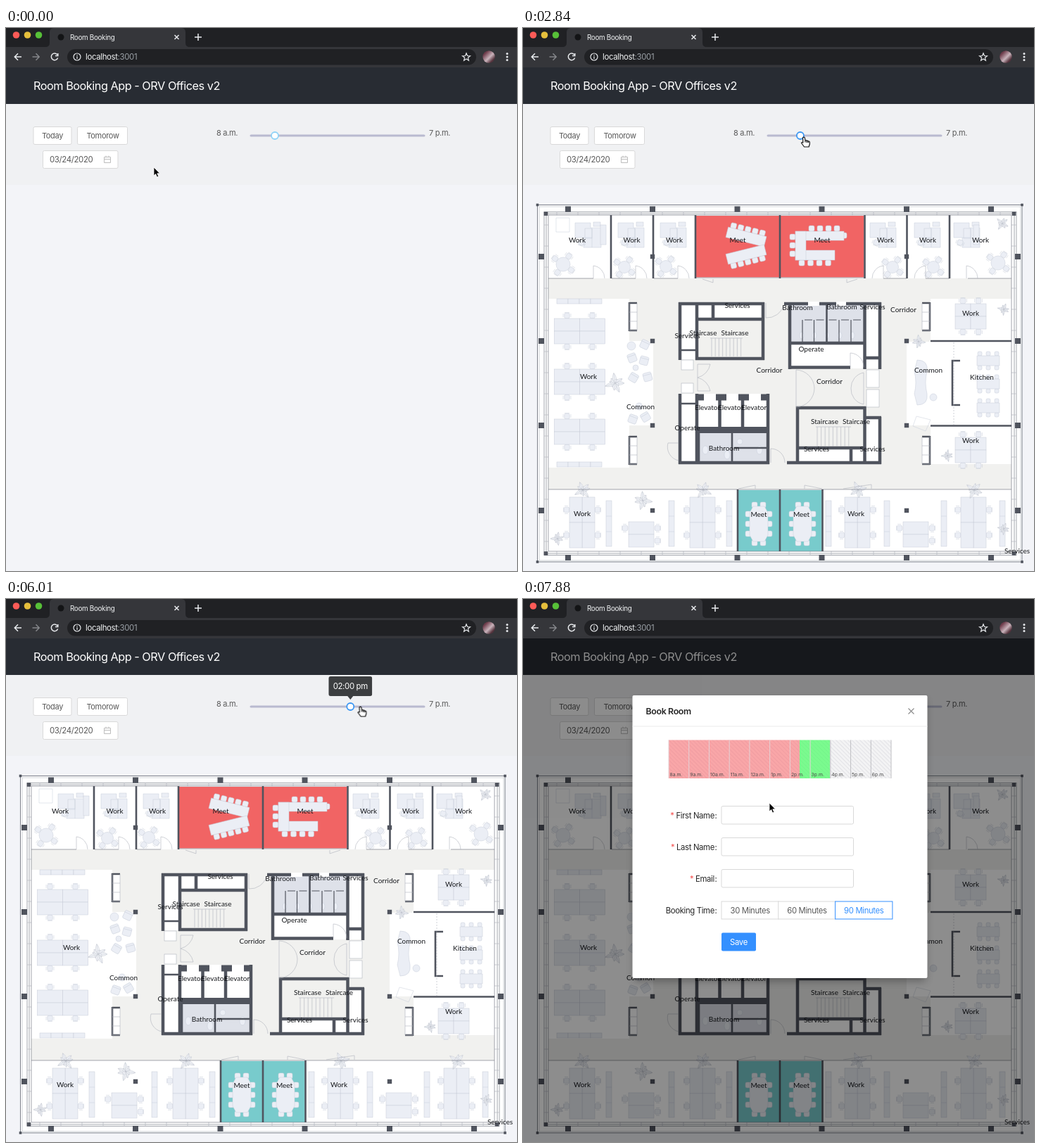
Write an HTML page that moves like this. It is 726x772 px and loops after 8000 ms.

```html
<!DOCTYPE html>
<html lang="en">
<head>
<meta charset="utf-8">
<title>Room Booking</title>
<style>
html, body { margin: 0; width: 100%; height: 100%; overflow: hidden; background: #f3f4f8; }
svg { display: block; }
text { font: 11px Inter, sans-serif; letter-spacing: -.03em; fill: #595959; }
.mid { text-anchor: middle; }
.end { text-anchor: end; }
.box { fill: #fff; stroke: #d9d9d9; }
.icon { fill: none; stroke: #e8eaed; stroke-width: 1.5; }

.wall { fill: none; stroke: #50545e; stroke-width: 4.5; }
.thin { stroke-width: 2.6; }
.thick { stroke-width: 9; }
.line { fill: none; stroke: #b0b4bc; stroke-width: .6; }
.edge { fill: none; stroke: #7c808a; stroke-width: .7; }
.white { fill: #fff; }
.floor { fill: #f1f1ef; }
.tile { fill: #dee1e9; }
.pillar { fill: #50545e; }
.furn { fill: #ebeef5; stroke: #c6ccd8; stroke-width: .5; }
.leaf { fill: #f3f5f9; stroke: #bcc1cb; stroke-width: .45; }
.label text { font: 10px Lato, sans-serif; letter-spacing: 0; fill: #16181c; text-anchor: middle; }
.form text { font-size: 11.3px; }

@property --n { syntax: "<integer>"; inherits: true; initial-value: 0; }
.plan, .furn-layer, .busy, .free, .cursor, .arrow, .hand, .slider, .ring, .tip, .mask, .modal {
  animation: 8s linear infinite;
}
.plan, .arrow, .hand, .slider, .ring, .tip { animation-timing-function: step-end; }
.plan { animation-name: plan; }
.furn-layer { animation-name: furnish; }
.busy { animation-name: busy; }
.free { animation-name: free; }
.cursor { animation-name: move; }
.arrow { animation-name: arrow; }
.hand { animation-name: hand; }
.slider { animation-name: slide; }
.knob { transform: translateX(calc(var(--n) * 11.92px)); }
.times { transform: translateY(calc(var(--n) * -28px)); }
.ring { animation-name: ring; fill: #fff; stroke-width: 1.8; }
.tip { animation-name: tip; }
.mask { animation-name: mask; }
.modal { animation-name: zoom; transform-origin: 365px 342px; }

@keyframes plan { 0% { opacity: 0 } 1.5%, 100% { opacity: 1 } }
@keyframes furnish {
  0%, 5% { opacity: 0 } 8.875%, 13% { opacity: .9 } 14.875%, 100% { opacity: 1 }
}
@keyframes busy {
  0%, 17.75% { fill: #fff } 24%, 77.25% { fill: #f16464 } 82%, 100% { fill: #78cbcc }
}
@keyframes free { 0%, 17.75% { fill: #fff } 24%, 100% { fill: #78cbcc } }
@keyframes move {
  0%, 18.125% { transform: translate(210px, 198px) }
  19.25% { transform: translate(290px, 188px) }
  20.75% { transform: translate(427px, 167.5px) }
  23.625% { transform: translate(415px, 160px) }
  28.125% { transform: translate(397px, 157px) }
  31%, 35% { transform: translate(398px, 155px) }
  41.25% { transform: translate(410.5px, 155px) }
  47.125% { transform: translate(422px, 155px) }
  53% { transform: translate(436.5px, 154px) }
  63.375% { transform: translate(472px, 153.5px) }
  75.125% { transform: translate(503.5px, 153px) }
  82%, 84.6% { transform: translate(510px, 153px) }
  89.625%, 100% { transform: translate(350px, 290px) }
}
@keyframes arrow { 0%, 85.25%, 100% { opacity: 1 } 29.5% { opacity: 0 } }
@keyframes hand { 0%, 85.25%, 100% { opacity: 0 } 29.5% { opacity: 1 } }
@keyframes ring { 0%, 92.625%, 100% { stroke: #8fd3f7 } 29.5% { stroke: #3b97f3 } }
@keyframes slide {
  0% { --n: 0 } 35.5% { --n: 1 } 47% { --n: 2 } 51.5% { --n: 3 } 57.5% { --n: 4 }
  60.3% { --n: 5 } 63.25% { --n: 6 } 67.5% { --n: 7 } 70.6% { --n: 8 }
  73.6% { --n: 9 } 78%, 100% { --n: 10 }
}
@keyframes tip {
  0%, 41.25%, 51.5%, 56%, 60.3%, 63.25%, 67.5%, 70.6%, 73.6%, 78%, 92.625%, 100% { opacity: 0 }
  37%, 48.6%, 53%, 58.9%, 61.75%, 64.75%, 69%, 72%, 75%, 79.5% { opacity: 1 }
}
@keyframes mask { 0%, 92.4% { opacity: 0 } 95.625% { opacity: .18 } 98.2%, 100% { opacity: .45 } }
@keyframes zoom {
  0%, 92.3% { transform: scale(.2); opacity: 0 }
  94.1% { transform: scale(.62); opacity: .6 }
  95.625% { transform: scale(.888); opacity: .93 }
  97.8%, 100% { transform: none; opacity: 1 }
}
</style>
</head>
<body>
<svg width="726" height="772" viewBox="0 0 726 772">
  <defs>
    <pattern id="hatch" width="4" height="4" patternUnits="userSpaceOnUse" patternTransform="rotate(-45)">
      <path fill="#f3f3f4" d="M0 0H4V4H0Z"/><path fill="#e2e2e6" d="M0 0H1V4H0Z"/>
    </pattern>
    <linearGradient id="photo" x2="1" y2="1">
      <stop offset=".2" stop-color="#6d3b4a"/><stop offset=".55" stop-color="#c9b3bb"/><stop offset=".8" stop-color="#54323c"/>
    </linearGradient>
    <filter id="soft" x="-20%" y="-20%" width="140%" height="140%"><feGaussianBlur stdDeviation="6"/></filter>
  </defs>

  <path fill="#f3f4f8" d="M0 0H726V772H0Z"/>
  <path fill="#f0f1f3" d="M0 108H726V223H0Z"/>

  <!-- browser bar -->
  <path fill="#202124" d="M0 0H726V28H0Z"/>
  <path fill="#35363a" d="M0 27H56Q62 27 62 21V6Q62 0 68 0H249Q255 0 255 6V21Q255 27 261 27H726V56H0Z"/>
  <circle cx="14.5" cy="10" r="4.8" fill="#fc5b57"/>
  <circle cx="30.5" cy="10" r="4.8" fill="#e5bf3c"/>
  <circle cx="46.5" cy="10" r="4.8" fill="#57c038"/>
  <circle cx="78" cy="13" r="4.5" fill="#131416"/>
  <text x="91" y="16.7" style="font-size:9.8px;fill:#f1f3f4">Room Booking</text>
  <path class="icon" d="M239.5 10L245.5 16M245.5 10L239.5 16M268 13H278M273 8V18"/>
  <path class="icon" d="M22 41H12.5M17 36.3L12.3 41L17 45.7M73 38A4.8 4.8 0 1 0 73.6 42.5M73.8 36V39.6H70"/>
  <path class="icon" style="stroke:#85878b" d="M37.5 41H47M42.5 36.3L47.2 41L42.5 45.7"/>
  <rect x="87" y="30" width="581" height="22.5" rx="11.25" fill="#202124"/>
  <g class="icon" style="stroke-width:1.2">
    <circle cx="101" cy="41" r="5"/><path d="M101 40.3V44M101 38V39.2"/>
    <path d="M654 35.8L655.5 39.5 659.5 39.8 656.4 42.3 657.4 46.2 654 44 650.6 46.2 651.6 42.3 648.5 39.8 652.5 39.5Z"/>
  </g>
  <text x="113" y="45.3" style="font-size:11.4px;fill:#f1f3f4">localhost<tspan fill="#9aa0a6">:3001</tspan></text>
  <circle cx="686" cy="41" r="8.7" fill="url(#photo)"/>
  <g fill="#e8eaed"><circle cx="712" cy="36.5" r="1.5"/><circle cx="712" cy="41" r="1.5"/><circle cx="712" cy="45.5" r="1.5"/></g>

  <!-- page header and filters -->
  <path fill="#282c33" d="M0 56H726V108H0Z"/>
  <text x="39" y="88" style="font-size:16.3px;fill:#fff">Room Booking App - ORV Offices v2</text>
  <g class="box">
    <rect x="39" y="140.5" width="54" height="25" rx="2"/><rect x="101.5" y="140.5" width="71" height="25" rx="2"/>
    <rect x="52.5" y="174.5" width="106.5" height="25" rx="2"/>
  </g>
  <text class="mid" x="66" y="157">Today</text>
  <text class="mid" x="137.5" y="157">Tomorow</text>
  <text x="62" y="191" style="font-size:11.4px">03/24/2020</text>
  <path fill="none" stroke="#bdbdbd" d="M139.5 183.5H148.5V191.5H139.5ZM139.5 186.5H148.5M142 181.5V184M146 181.5V184"/>
  <text x="299" y="153">8 a.m.</text>
  <text x="601" y="153">7 p.m.</text>

  <g class="plan" id="plan"></g>

  <rect x="346.5" y="151.4" width="249" height="3.2" rx="1.6" fill="#b9bad0"/>
  <g class="slider"><g class="knob">
    <circle class="ring" cx="382" cy="153" r="5"/>
    <g class="tip">
      <path fill="#3c3e40" d="M354 110H410Q413 110 413 113V135Q413 138 410 138H386L382 143L378 138H354Q351 138 351 135V113Q351 110 354 110Z"/>
      <svg x="351" y="110" width="62" height="28"><g class="times" id="times"></g></svg>
    </g>
  </g></g>

  <path class="mask" d="M0 56H726V772H0Z"/>
  <g class="modal" id="modal"></g>

  <g class="cursor">
    <path class="arrow" stroke="#fff" stroke-width=".8" d="M0 0V12L2.7 9.5 4.6 14 6.7 13.1 4.8 8.8H8.5Z"/>
    <path class="hand" fill="#fff" stroke="#111" stroke-width="1.2" stroke-linejoin="round"
      d="M-1.5 1Q0 -.8 1.3 1L2 5Q3.5 4 4.3 5.5 5.8 4.6 6.3 6.2 8 5.8 8.3 7.5V10L7 14H.5L-3.5 8.5Q-3.3 6.8-1.2 8ZM2 5V7.5M4.3 5.5V8M6.3 6.2V8.2"/>
  </g>
</svg>

<script>
const $ = id => document.getElementById(id);
const rect = (x, y, w, h, cls = "", extra = "") =>
  `<rect x="${x}" y="${y}" width="${w}" height="${h}" class="${cls}" ${extra}/>`;
const path = (d, cls = "", extra = "") => `<path d="${d}" class="${cls}" ${extra}/>`;
const oval = (x, y, rx, ry = rx) => `<ellipse cx="${x}" cy="${y}" rx="${rx}" ry="${ry}"/>`;
const text = (x, y, s, cls = "", style = "") =>
  `<text x="${x}" y="${y}" class="${cls}" style="${style}">${s}</text>`;
const at = (x, y, s, turn = 0) => `<g transform="translate(${x} ${y}) rotate(${turn})">${s}</g>`;
const each = (list, f) => list.map(f).join("");
const count = (n, f) => Array.from({ length: n }, (_, i) => f(i)).join("");

// furniture
const seat = (x, y, s = 8) => rect(x - s / 2, y - s / 2, s, s, "", 'rx="2"');
const chair = (x, y, turn = 0) => at(x, y, seat(0, 0, 7.5) + path("M-5.5-2V3M5.5-2V3M-3.5 4.5H3.5"), turn);
const pod = (x, y, turn = 0, w = 36) => at(x, y,
  each([-1, 1], i => chair(i * w / 2, 22) + chair(i * w / 2, -22, 180)) +
  each([-w, 0], i => rect(i, -18, w, 18) + rect(i, 0, w, 18)), turn);
const round = (x, y, r = 8.5) => at(x, y,
  count(4, i => at(0, 0, chair(0, r + 4), i * 90 + 35)) + oval(0, 0, r));
const plant = (x, y, r = 12) => `<g class="leaf">` + at(x, y, count(11, i => {
  const len = r * (.7 + .3 * Math.sin(i * 2.3 + x));
  return at(0, 0, path(`M0 0Q${len / 2} ${-r / 3} ${len} 0Q${len / 2} ${r / 3} 0 0H${len}`), i * 32.7 + x);
})) + `</g>`;
const office = x => at(x, 0,
  path("M0 277H22V284H37V312H12V298H0Z") + chair(9, 305, 20) + rect(14, 285, 10, 14) + rect(26, 276, 10, 6) +
  path("M24 285V312M12 298H24"));
const strip = x => rect(x - 4, 672, 8, 65) + path(`M${x - 4} 694h8m-8 22h8`);
const arm = (x, y, turn) => at(x, y, rect(-6, -6, 12, 12, "", 'rx="2"') + path("M-6-3H6"), turn);

// meeting tables
const slant = (y, turn, side) => at(317, y,
  count(5, i => seat(-21 + i * 10.5, side * 11)) + rect(-28, -7.5, 56, 15), turn);
const horseshoe = () =>
  count(4, i => seat(410 + i * 12, 285) + seat(396 + i * 12.5, 334)) +
  count(3, i => seat(383, 297 + i * 12)) + seat(456, 295) +
  rect(387, 289, 69, 13) + rect(387, 316, 56, 14) + rect(387, 289, 15, 41);
const board = x => at(x, 705,
  each([-1, 1], s => count(3, i => seat(s * 15, -14 + i * 14)) + seat(s * 6, -27) + seat(s * 6, 27)) +
  path("M-8-25H8L13-16V16L8 25H-8L-13 16V-16Z"));
const canteen = y => at(661, y,
  count(3, i => seat(-12 + i * 12, 10, 6) + seat(-12 + i * 12, -10, 6)) + rect(-16, -7, 32, 14));

const furniture = () => `<g class="furn furn-layer">` +
  path("M47 270h19v20h-19Z", "", 'fill="none"') +
  each([74, 135, 195, 493, 556, 612], office) + rect(110, 280, 8, 28) + rect(640, 280, 8, 28) +
  round(57, 336, 10) + round(144, 340) + round(203, 339) + round(525, 340) + round(583, 340) + round(675, 334, 10) +
  plant(681, 278, 10) +
  slant(297, 14, -1) + slant(322, -14, 1) + horseshoe() + board(335) + board(397) +
  each([431, 503, 574], y => pod(80.5, y)) +
  count(4, i => rect(48 + i * 16, 385, 16, 7) + rect(48 + i * 16, 617, 16, 7)) +
  plant(131, 505, 15) + oval(154, 452, 6) + oval(160, 483, 4) + oval(165, 538, 5) +
  arm(173, 450, 25) + arm(155, 469, -20) + arm(172, 473, 15) + arm(157, 497, 30) + arm(177, 496, -15) +
  arm(156, 556, 20) + arm(174, 553, -30) +
  each([84, 255, 475, 640], x => pod(x, 703, 90) + plant(x + 1, 657, 13)) +
  each([168, 558], x => rect(x - 18, 702, 36, 18) + rect(x - 18, 720, 36, 18) +
    chair(x - 23, 711, 90) + chair(x + 23, 729, -90) + chair(x + 23, 711, -90)) +
  each([122, 211, 293, 434, 517, 598, 681], strip) +
  plant(170, 672, 14) + plant(49, 726, 10) + plant(683, 712, 9) +
  pod(636, 410, 0, 22) + pod(636, 600, 0, 22) + plant(683, 400, 9) + plant(603, 608, 9) + plant(562, 446, 10) +
  path("M560 472Q576 472 574 488Q570 504 574 520Q576 536 560 536L556 520Q560 504 556 488Z") + oval(583, 525, 5) +
  path("M559 552l20 5l-7 16l-18-7Z", "", 'fill="none"') +
  each([473, 506, 540], canteen) +
  count(5, i => oval(396 + i * 18, 437, 3, 5)) +
  oval(259, 600, 4, 6) + oval(290, 607, 4, 6) + oval(308, 588, 4) + oval(336, 600, 4, 6) +
  `</g>`;

// building
const pillars = () => {
  const xs = [64, 184, 304.5, 424.5, 545, 665], ys = [325, 445, 565, 686];
  const dot = (x, y, r = 4) => rect(x - r, y - r, 2 * r, 2 * r, "pillar");
  return each(xs, x => dot(x, 257.5) + dot(x, 753)) +
    each(ys, y => dot(26, y) + dot(703, y) + dot(184, y, 3.2) + dot(545, y, 3.2)) +
    each([32.5, 697.5], x => dot(x, 264, 2.8) + dot(x, 747, 2.8)) +
    each([20.5, 709], x => dot(x, 251.5, 1.8) + dot(x, 759, 1.8));
};
const facade = () =>
  rect(20.5, 251.5, 688.5, 507.5, "white") +
  rect(20.5, 251.5, 688.5, 507.5, "edge", 'style="stroke-width:1"') +
  rect(23, 254, 684, 503, "line") + rect(30, 261.5, 671, 488, "edge") + rect(33, 264, 665, 483, "edge") +
  count(22, i => path(`M${48 + i * 30} 261.5v4.5M${48 + i * 30} 744v5.5`, "line")) +
  count(16, i => path(`M30 ${280 + i * 30}h6M694 ${280 + i * 30}h7`, "line"));
const rooms = () =>
  rect(36, 266, 658, 478, "floor") +
  rect(36, 266, 658, 90, "white") + rect(36, 656, 658, 88, "white") +
  rect(36, 385, 115, 240, "white") + rect(150, 445, 35, 120, "white") +
  rect(579, 385, 115, 235, "white") + rect(545, 446, 40, 119, "white") +
  rect(246, 267, 118.5, 87.5, "busy") + rect(366, 267, 118.5, 87.5, "busy") +
  rect(306, 657, 58.5, 87, "free") + rect(366, 657, 58.5, 87, "free") +
  rect(223, 392, 22, 79, "white") + rect(247, 392, 94, 22, "white") + rect(380, 392, 128, 92, "white") +
  rect(223, 520, 21, 98, "white") + rect(247, 522, 101, 96, "white") +
  rect(390, 598, 118, 20, "white") + rect(487, 553, 21, 65, "white") +
  rect(380, 394, 104, 52, "tile") + rect(249, 576, 98, 41, "tile");
const walls = () =>
  path("M36 266H694V744H36ZM36 356H100M126 356H160M186 356H220M246 355H485M512 356H545M572 356H606M632 356H694M36 656H694", "edge") +
  path("M125 266V356M185 266V356M245 266V356M365 266V356M485.5 266V356M545.5 266V356M606 266V356M305 656V744M365 656V744M425.5 656V744M579 445H694M579 565.5H694", "wall thin") +
  path("M221 392H343M223 390V472M247 390V472M247 414H343M341 390V472M245 470H343M270 392V413", "wall") +
  path("M371 392H509M379 390V485M379 448H485M377 482.5H465M485.5 390V485M507 390V485M485 469H509", "wall") +
  path("M223 520V620M247 520V620M279.5 524V571M312 524V571M348 520V620M221 618H350", "wall") +
  path("M245 525H350M245 571.5H350", "wall thick") +
  path("M390 538V620M388 540H487M485.5 538V620M388 597H487M466 597V618M375 618H509M507 553V620M486 554H509", "wall") +
  path("M221 458H245M221 534H245M431.5 392V448M297 576V618M300 597H346M250 576V618", "wall thin") +
  each([397, 413.5, 431.5, 449, 466], x => path(`M${x} 415V446M${x + 3} 415h11`, "wall", 'style="stroke-width:1.2"')) +
  each([257, 289, 321], x => rect(x, 520, 17, 10, "white")) + rect(405, 389, 16, 6, "white") + rect(445, 389, 14, 6, "white") +
  each([151, 567], x => each([391, 581], y => rect(x, y, 11, 39, "white") +
    path(`M${x} ${y}h11M${x} ${y + 39}h11M${x + (x < 300 ? 0 : 11)} ${y - 1}v41`, "wall thin") +
    path(`M${x} ${y}v39h11v-39M${x} ${y + 13}h11m-11 13h11`, "line"))) +
  path("M621 473H610V536H621", "wall thin") +
  path("M612 447V564", "line", 'stroke-dasharray="2 2"') +
  each([472, 505], y => rect(225, y, 17, 14, "white") + rect(225, y, 17, 14, "line")) +
  each([486, 514], y => rect(488, y, 18, 25, "white") + rect(488, y, 18, 25, "line")) +
  count(9, i => path(`M${268 + i * 5.2} 441V467M${418 + i * 5.6} 567V595`, "line")) +
  path("M266 441H312M416 567H466", "line");
const doors = () => each([100, 160, 220, 630], x => path(`M${x} 356V338A18 18 0 0 1 ${x + 16} 356`, "line")) +
  path("M512 356V338A18 18 0 0 0 496 356M572 356V338A18 18 0 0 0 556 356M255 357L270 362V357M475 357L460 362V357", "line") +
  path("M248 478H266A24 24 0 0 1 248 497A24 24 0 0 1 266 516H248ZM388 486A27 27 0 0 1 414 512A27 27 0 0 1 388 539Z", "line") +
  path("M484 490A22 22 0 0 0 466 512A22 22 0 0 0 484 535ZM345 391V412A24 24 0 0 0 370 394M221 590H206A20 20 0 0 0 221 615M352 618V598A20 20 0 0 1 372 618M465 482V462A20 20 0 0 1 484 482", "line") +
  path("M306 655L330 650V655M425 655L400 650V655M455 655L495 649V655", "line");

const places = {
  Work: [77, 305, 154.5, 305, 215, 305, 515, 305, 575, 305, 650, 305, 93, 499, 84, 694, 473, 694, 636, 409, 636, 590],
  Meet: [305, 305, 425, 305, 335, 695, 395.5, 695],
  Services: [304.5, 397.5, 233.5, 441, 496.5, 400, 417, 602, 496.5, 602, 702, 747],
  Staircase: [256, 436.5, 301, 436.5, 428.5, 563, 473.5, 563],
  Bathroom: [390, 401, 453, 400, 285.5, 600.5],
  Corridor: [350, 490, 435.5, 506, 540.5, 404],
  Operate: [409.5, 460, 233.5, 572],
  Elevator: [262, 543, 295, 543, 328, 543],
  Common: [167, 542, 576, 490],
  Kitchen: [652, 499.5]
};
const labels = () => `<g class="label">` + each(Object.entries(places), ([name, p]) =>
  count(p.length / 2, i => text(p[2 * i], p[2 * i + 1], name))) + `</g>`;

$("plan").innerHTML = facade() + rooms() + furniture() + walls() + doors() + pillars() + labels();

// slider times, half an hour apart
$("times").innerHTML = count(11, i => {
  const h = 9.5 + i / 2, hour = Math.floor(h < 13 ? h : h - 12);
  const time = `${String(hour).padStart(2, "0")}:${h % 1 ? "30" : "00"} ${h < 12 ? "am" : "pm"}`;
  return text(31, 18 + i * 28, time, "mid", "fill:#fff;font-size:11.4px");
});

// booking form
const dark = "fill:#262626", blue = "#3490ff", slot = 28.73;
const field = (y, name) => rect(282, y, 187.5, 25.5, "box", 'rx="2"') +
  text(275.5, y + 17, `<tspan fill="#f5504e">*</tspan> ${name}&#8202;:`, "end", dark);
const hours = () =>
  rect(207, 200.5, 316, 54.5, "", 'fill="url(#hatch)"') +
  rect(207, 200.5, 186, 54.5, "", 'fill="#ff5a5f" opacity=".5"') +
  rect(393, 200.5, 43, 54.5, "", 'fill="#3dff5c" opacity=".66"') +
  count(12, i => path(`M${207 + i * slot} 200.5V255`, "", `stroke="${i < 8 ? "#e3d3d6" : "#bfbfc4"}"`)) +
  count(11, i => text(208.5 + i * slot, 252, i < 5 ? `${8 + i}a.m.` : `${i - 4}p.m.`, "",
    "font-size:6.8px;letter-spacing:0;fill:#4a4a4a"));
const choice = (minutes, i) => {
  const on = i == 2, x = 282 + i * 80.8;
  return rect(x, 430, 81.3, 25, "box", on ? `style="stroke:${blue}"` : "") +
    text(x + 40.7, 446.5, minutes + " Minutes", "mid", on ? "fill:" + blue : "");
};
$("modal").innerHTML =
  rect(158, 144, 414, 399, "", 'opacity=".3" filter="url(#soft)"') +
  rect(155.5, 137, 419, 402, "white", 'rx="2"') +
  text(174.5, 163.5, "Book Room", "", "font-size:12.4px;font-weight:600;" + dark) +
  path("M547.5 155.5L555.5 163.5M555.5 155.5L547.5 163.5", "", 'stroke="#8c8c8c" stroke-width="1.1"') +
  path("M155.5 181H574.5", "", 'stroke="#ebebeb"') +
  hours() + `<g class="form">` +
  field(294.5, "First Name") + field(339.5, "Last Name") + field(384.5, "Email") +
  text(275.5, 446.5, "Booking Time&#8202;:", "end", dark) + each([30, 60, 90], choice) +
  rect(282, 474.5, 49, 26, "", `rx="2" fill="${blue}"`) +
  text(306.5, 491.5, "Save", "mid", "fill:#fff") + `</g>`;
</script>
</body>
</html>
```
